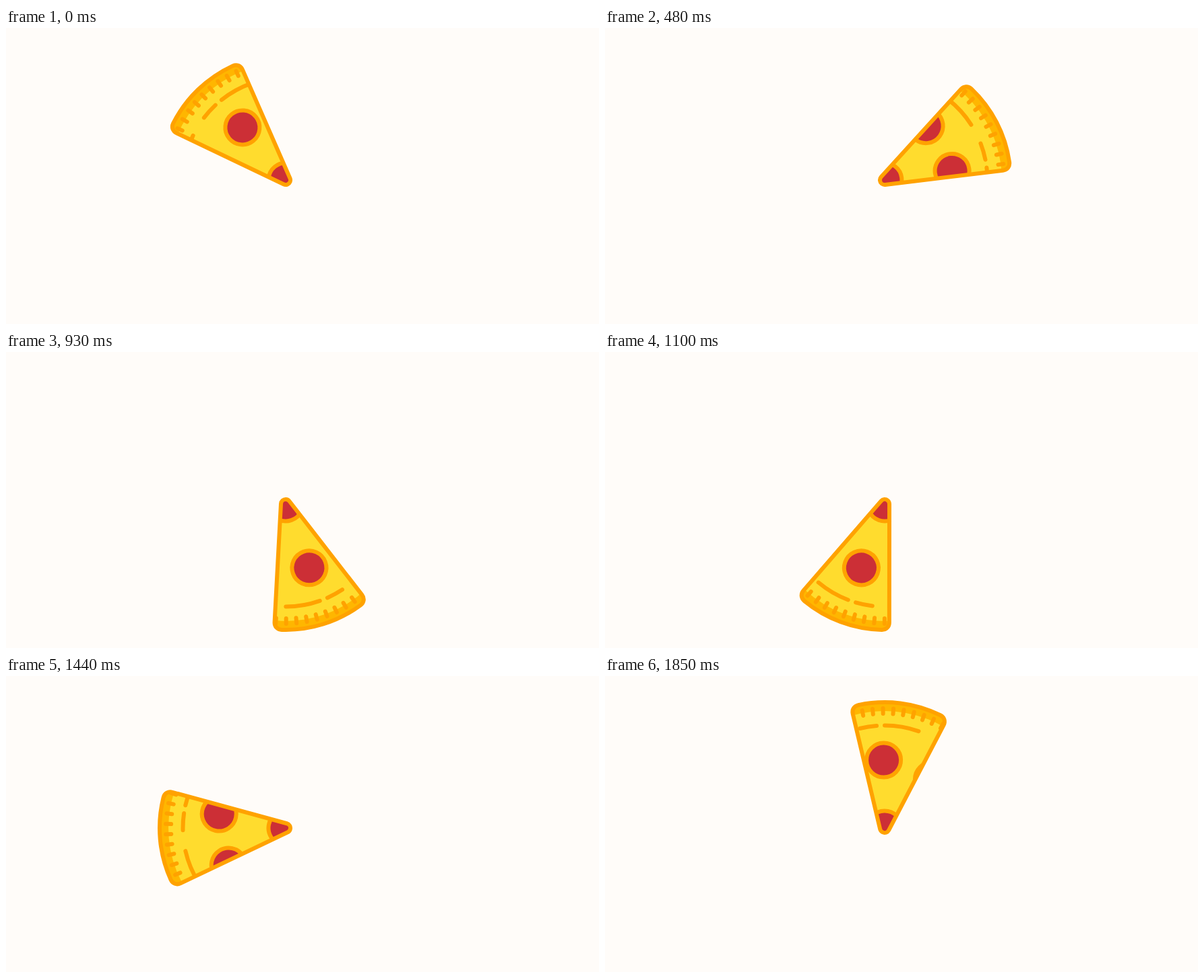
Recreate the animation shown at these times as an HTML page. Size 880x440 px, loop 1950 ms.

```html
<!DOCTYPE html>
<html lang="en">
<head>
<meta charset="utf-8">
<title>Pizza slice</title>
<style>
  html, body { margin: 0; width: 100%; height: 100%; overflow: hidden; background: #fffcf9; }
  svg { display: block; width: 880px; height: 440px; }
  .line { fill: none; stroke: #ffa200; stroke-width: 6; stroke-linecap: round; }
  .ring { fill: #cc2f36; stroke: #ffa200; stroke-width: 6; }
</style>
</head>
<body>
<svg viewBox="0 0 880 440">
  <defs>
    <path id="wedge" stroke-linejoin="round"/>
    <mask id="window" maskUnits="userSpaceOnUse" x="-200" y="-200" width="400" height="400">
      <use href="#wedge" fill="#fff" stroke="#fff" stroke-width="8"/>
    </mask>
  </defs>
  <g transform="translate(415 226)">
    <g id="slice">
      <use href="#wedge" fill="#ffa200" stroke="#ffa200" stroke-width="20"/>
      <g mask="url(#window)">
        <g id="pizza">
          <circle r="192" fill="#ffb600"/>
          <circle r="174" fill="#ffdc2e"/>
          <path id="ticks" class="line"/>
          <path id="dashes" class="line"/>
        </g>
      </g>
    </g>
  </g>
</svg>
<script>
const $ = id => document.getElementById(id);

// Polar point: degrees clockwise from straight up.
const polar = (r, deg) => {
  const a = deg * Math.PI / 180;
  return (r * Math.sin(a)).toFixed(2) + ' ' + (-r * Math.cos(a)).toFixed(2);
};
const arc = (r, from, to) => `M${polar(r, from)}A${r} ${r} 0 0 1 ${polar(r, to)}`;

// Sector with softly rounded outer corners.
const HALF = 20.4, R = 180, SOFT = 4;
const inner = HALF - SOFT / R * 180 / Math.PI;
$('wedge').setAttribute('d',
  `M0 0L${polar(R - SOFT, -HALF)}Q${polar(R, -HALF)} ${polar(R, -inner)}` +
  `A${R} ${R} 0 0 1 ${polar(R, inner)}Q${polar(R, HALF)} ${polar(R - SOFT, HALF)}Z`);

let ticks = '', dashes = '';
for (let a = 0; a < 360; a += 5) ticks += `M${polar(170, a)}L${polar(178, a)}`;
for (let a = 0; a < 360; a += 45) {
  dashes += arc(152.5, a - 13.2, a - 3.7) + arc(152.5, a + 0.8, a + 20.1);
}
$('ticks').setAttribute('d', ticks);
$('dashes').setAttribute('d', dashes);

function addTopping(r, deg) {
  const c = document.createElementNS('http://www.w3.org/2000/svg', 'circle');
  c.setAttribute('class', 'ring');
  c.setAttribute('r', 25.5);
  c.setAttribute('transform', `translate(${polar(r, deg)})`);
  $('pizza').append(c);
}
addTopping(0, 0);
for (let a = 0; a < 360; a += 45) addTopping(101, a);

// The window turns once per TURN while the pizza drifts back by one topping.
const LOOP = 1950, TURN = 1620;
const STEPS = [
  0, 50, 90, 140, 180, 220, 270, 310, 340, 390, 430, 480, 520, 570,
  630, 690, 750, 810, 870, 930, 980, 1040, 1100,
  1160, 1210, 1250, 1300, 1330, 1390, 1450, 1510, 1560, 1620, 1680,
  1730, 1790, 1850
];

function draw(time) {
  const t = time % LOOP;
  const turns = STEPS.filter(s => s <= t).pop() / TURN;
  const window = -44 + 360 * turns;
  const base = -39.4 - 45 * turns;
  $('slice').setAttribute('transform', `rotate(${window})`);
  $('pizza').setAttribute('transform', `rotate(${base - window})`);
}

const start = performance.now();
function tick() {
  draw(Math.max(0, performance.now() - start));
  requestAnimationFrame(tick);
}
tick();
</script>
</body>
</html>
```
